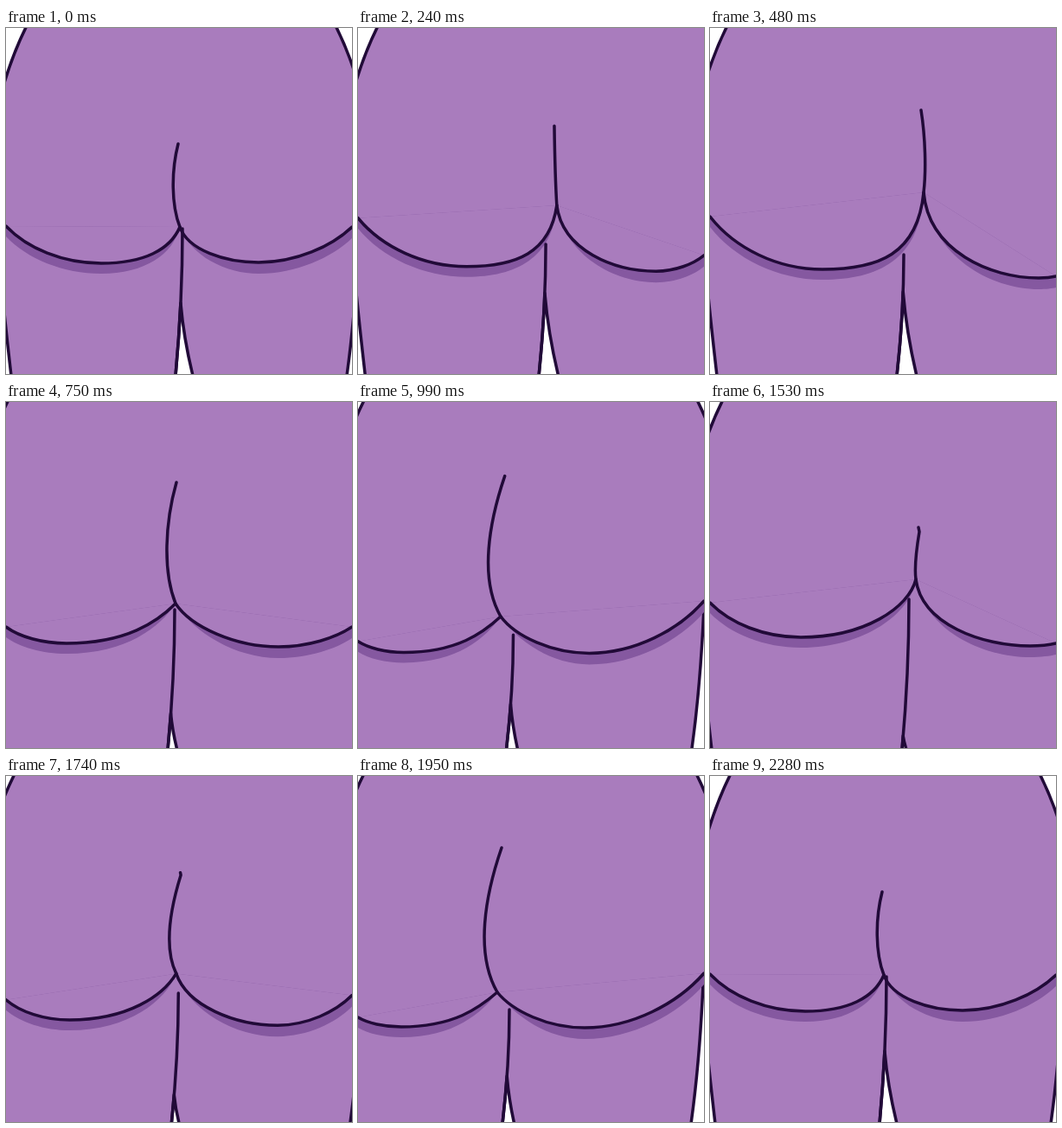
Write an HTML page with a canvas that moves like this. It is 400x400 px and loops after 2.31 s.

```html
<!DOCTYPE html>
<html>
<head>
<meta charset="utf-8">
<style>
html, body { margin: 0; width: 100%; height: 100%; overflow: hidden; background: #fff; }
canvas { display: block; width: 100vw; height: 100vh; }
</style>
</head>
<body>
<canvas id="stage" width="400" height="400"></canvas>
<script>
const ctx = document.getElementById('stage').getContext('2d');
const SKIN = '#a97cbd', SHADE = '#8558a0', LINE = '#210a38';
const LOOP = 2310, STEP = 30;

// hips L R | legs L R | seam x y, gap y | left lobe: edge y, bottom x y, bend x y
// join x y | crease top x y, bends x x | right lobe: bend y, bottom x y, edge y | hook
const center = [22, 17, 6, 394, 204, 232, 318, 229, 110, 272, 190, 256, 201, 230, 199, 134, 191, 191, 257, 292, 271, 230, 0];
const high = [18, -20, 8, 412, 224, 262, 305, 218, 130, 279, 240, 262, 247, 190, 244, 95, 249, 250, 258, 380, 289, 287, 0];
const wide = [1, -20, -8, 412, 195, 240, 360, 260, 70, 279, 175, 254, 196, 233, 197, 93, 184, 181, 260, 315, 283, 260, 0];
const right = [8, -20, 8, 412, 244, 240, 385, 238, 100, 276, 224, 242, 234, 214, 233, 125, 228, 227, 254, 365, 279, 274, 0];
const low = [13, -20, 2, 412, 230, 228, 386, 232, 105, 272, 230, 238, 238, 205, 242, 150, 239, 236, 257, 370, 282, 279, 1];
const left = [5, 7, -8, 385, 175, 270, 347, 279, 50, 290, 140, 268, 161, 250, 166, 83, 147, 135, 272, 262, 291, 228, 0];

const keys = [[0, center], [480, high], [750, wide], [960, left], [1230, right],
  [1530, low], [1950, left], [2280, center]];

function key(i) {
  const n = keys.length, turn = Math.floor(i / n);
  const [t, pose] = keys[i - turn * n];
  return [t + turn * LOOP, pose];
}

// Cubic Hermite through the key poses
function poseAt(t) {
  let i = keys.length - 1;
  while (keys[i][0] > t) i--;
  const [[ta, a], [tb, b], [tc, c], [td, d]] = [-1, 0, 1, 2].map(k => key(i + k));
  const span = tc - tb, u = (t - tb) / span;
  return b.map((v, k) => {
    const m0 = (c[k] - a[k]) / (tc - ta) * span;
    const m1 = (d[k] - v) / (td - tb) * span;
    const gap = c[k] - v;
    return v + u * (m0 + u * (3 * gap - 2 * m0 - m1 + u * (m0 + m1 - 2 * gap)));
  });
}

function shape(fill, stroke, build) {
  const path = new Path2D();
  build(path);
  if (fill) { ctx.fillStyle = fill; ctx.fill(path); }
  if (stroke) ctx.stroke(path);
}

function hip(x) {
  shape('#fff', true, p => {
    p.moveTo(x + 8, -14);
    p.quadraticCurveTo(x - 12, 22, x - 26, 70);
    p.lineTo(-50, 70);
    p.lineTo(-50, -14);
  });
}

function draw(pose) {
  const [hipL, hipR, legL, legR, sx, sy, gapY, edgeL, bx, by, ex, ey,
    jx, jy, tx, ty, c1, c2, ky, rx, ry, edgeR, hook] = pose;

  ctx.fillStyle = SKIN;
  ctx.fillRect(0, 0, 400, 400);
  ctx.strokeStyle = LINE;
  ctx.lineWidth = 3.5;
  ctx.lineCap = ctx.lineJoin = 'round';

  hip(hipL);
  ctx.save();
  ctx.translate(400, 0);
  ctx.scale(-1, 1);
  hip(hipR);
  ctx.restore();

  // Outer legs
  shape('#fff', true, p => {
    p.moveTo(legL - 10, 310);
    p.quadraticCurveTo(legL - 6, 350, legL, 402);
    p.lineTo(-40, 402);
    p.lineTo(-40, 310);
  });
  shape('#fff', true, p => {
    p.moveTo(legR + 14, 240);
    p.quadraticCurveTo(legR + 10, 330, legR, 402);
    p.lineTo(450, 402);
    p.lineTo(450, 240);
  });

  // Gap between the legs
  const u = (gapY - sy) / (400 - sy), gapX = sx - 8 * u * u;
  const footL = sx - 8, footR = footL + (400 - gapY) * 0.22 + 2;
  shape('#fff', true, p => {
    p.moveTo(gapX, gapY);
    p.quadraticCurveTo(gapX + (footR - gapX) * 0.25, (gapY + 400) / 2, footR, 402);
    p.lineTo(footL, 402);
    p.quadraticCurveTo(gapX - 8 * u * (1 - u), (gapY + 400) / 2, gapX, gapY);
  });

  const w = 400 - rx, kx = jx + (jx - ex) * 0.85;
  const leftLobe = (p, d) => {
    p.bezierCurveTo(bx * 0.22, edgeL + (by - edgeL) * 0.6 + d, bx * 0.6, by + d, bx, by + d);
    p.bezierCurveTo(bx + (jx - bx) * 0.55, by + d, ex + d / 4, ey + d / 2, jx, jy);
  };
  const rightLobe = (p, d) => {
    p.bezierCurveTo(kx + d / 4, ky + d / 2, rx - (rx - jx) * 0.42, ry + d, rx, ry + d);
    p.bezierCurveTo(rx + w * 0.4, ry + d, 400 - w * 0.22, edgeR + (ry - edgeR) * 0.55 + d, 400, edgeR + d);
  };

  shape(SHADE, false, p => {
    p.moveTo(0, edgeL);
    p.lineTo(0, edgeL + 12);
    leftLobe(p, 12);
    p.lineTo(jx, jy);
  });
  shape(SHADE, false, p => {
    p.moveTo(jx, jy);
    rightLobe(p, 13);
    p.lineTo(400, edgeR);
  });
  // Skin covers the shadow above each lobe
  shape(SKIN, false, p => {
    p.moveTo(0, edgeL);
    leftLobe(p, 0);
  });
  shape(SKIN, false, p => {
    p.moveTo(jx, jy);
    rightLobe(p, 0);
  });

  shape(null, true, p => {
    p.moveTo(sx, sy);
    p.quadraticCurveTo(sx, (sy + 400) / 2, footL, 402);
  });
  shape(null, true, p => {
    p.moveTo(0, edgeL);
    leftLobe(p, 0);
  });
  shape(null, true, p => {
    const h = Math.max(0, hook);
    p.moveTo(tx - h, ty - 5 * h);
    p.lineTo(tx, ty);
    p.bezierCurveTo(c1, ty + (jy - ty) * 0.33, c2, ty + (jy - ty) * 0.73, jx, jy);
    rightLobe(p, 0);
  });
}

const start = performance.now();
function tick() {
  const t = (performance.now() - start) % LOOP;
  draw(poseAt(Math.floor(t / STEP) * STEP));
  requestAnimationFrame(tick);
}
tick();
</script>
</body>
</html>
```
